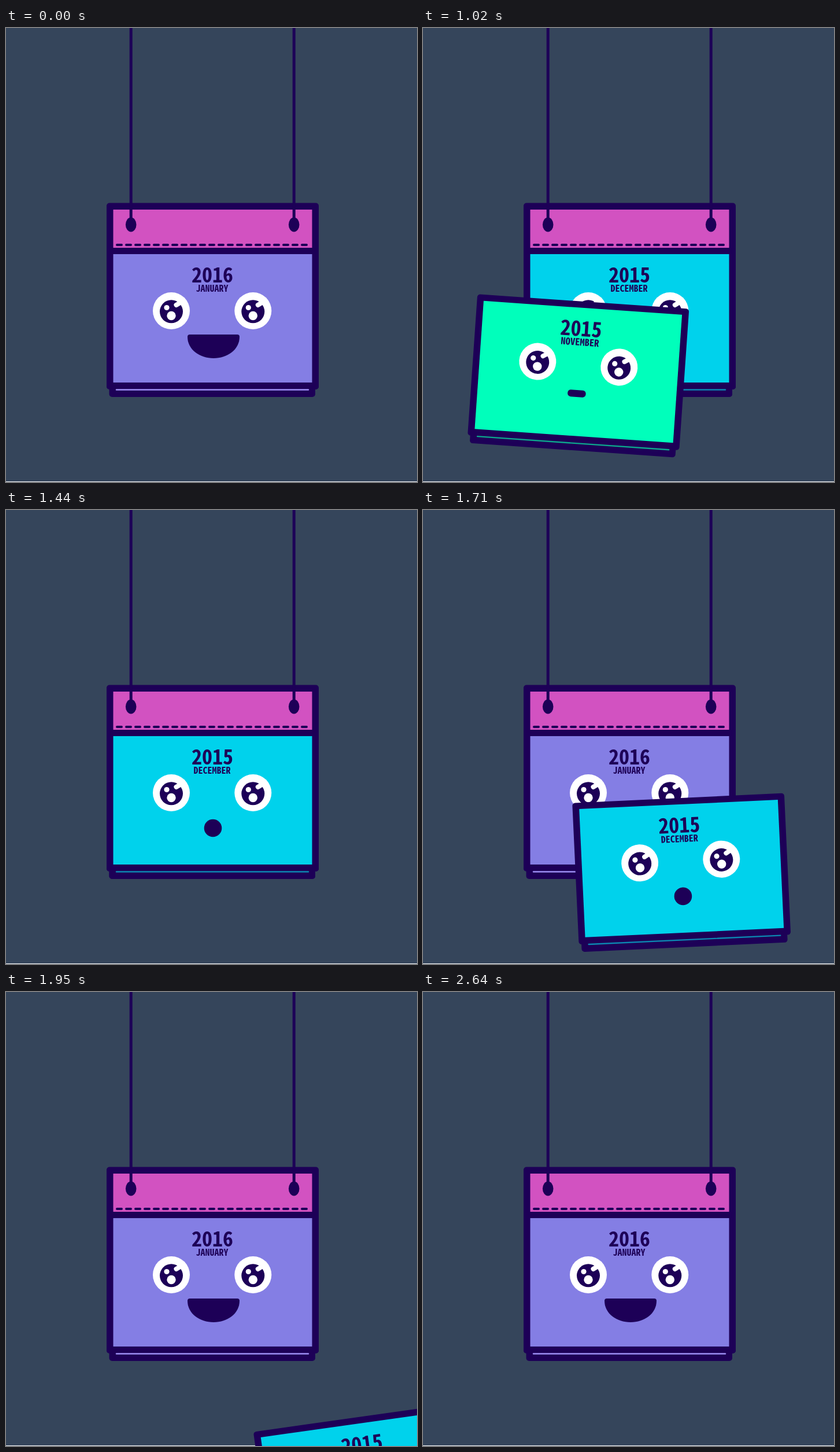
These frames come from a looping animation (711 by 785 pixels, 2.73 s). An HTML page:

```html
<!DOCTYPE html>
<html lang="en">
<head>
<meta charset="utf-8">
<title>Calendar</title>
<style>
  html, body { margin: 0; width: 100%; height: 100%; overflow: hidden; background: #fff; }
  svg { display: block; width: 100vw; height: 100vh; }
  text { font-weight: 600; font-stretch: 62.5%; text-anchor: middle; fill: #1d0057; }
  .year { font-size: 40.5px; }
  .month { font-size: 17.5px; }
  .ink { fill: #1d0057; }
  .white { fill: #fff; }
</style>
</head>
<body>
<svg id="stage" viewBox="0 0 711 785"></svg>
<script>
const stage = document.getElementById('stage');
const LOOP = 2730, STEP = 30;
const SHOW_OLD = 630; // the older pages reappear
const INK = '#1d0057';

const mouths = {
  smile: '<path class="ink" d="M318 530H400Q404 530 404 534C404 556 383 571 359 571S314 556 314 534Q314 530 318 530Z"/>',
  gasp: '<circle class="ink" cx="358" cy="550" r="15.3"/>',
  flat: '<rect class="ink" x="341.5" y="533.5" width="31.5" height="12" rx="5.5"/>'
};

// dx, dy in px per ms; spin in degrees per ms
const pages = [
  { year: 2016, month: 'JANUARY', width: 56, fill: '#847ee4', edge: '#9d8ff4', mouth: 'smile' },
  { year: 2015, month: 'DECEMBER', width: 64, fill: '#00d2ec', edge: '#0c86b0', mouth: 'gasp',
    start: 1590, dx: 0.75, dy: 0.983, spin: -1 / 45 },
  { year: 2015, month: 'NOVEMBER', width: 66, fill: '#00ffbb', edge: '#0da58c', mouth: 'flat',
    start: 900, dx: -0.7435, dy: 0.771, spin: 1 / 30 }
];

const eye = x => `<g transform="translate(${x} 489)">
  <circle class="white" r="32"/>
  <circle class="ink" cy="1.3" r="20"/>
  <circle class="white" cx="-8" cy="-5.5" r="4.6"/>
  <circle class="white" cy="8.5" r="7.7"/>
  <path d="M8.5-10L20-17" stroke="#fff" stroke-width="8" stroke-linecap="round"/>
</g>`;

const drawPage = p => `<g class="page">
  <rect class="ink" x="178.5" y="600" width="356.5" height="38" rx="5"/>
  <rect class="ink" x="174" y="380" width="367" height="245" rx="5"/>
  <rect x="185.5" y="391" width="344" height="222" fill="${p.fill}"/>
  <path d="M191 625.5H523" stroke="${p.edge}" stroke-width="2.4" stroke-linecap="round"/>
  <text class="year" x="357" y="440" data-width="72">${p.year}</text>
  <text class="month" x="356.5" y="456.3" data-width="${p.width}">${p.month}</text>
  ${eye(286)}${eye(427.3)}${mouths[p.mouth]}
</g>`;

const drawString = x => `<path d="M${x} 0V340" stroke="${INK}" stroke-width="5"/>
  <ellipse class="ink" cx="${x}" cy="340" rx="9.3" ry="12.5"/>`;

stage.innerHTML = `<rect width="711" height="784" fill="#35455b"/>
  <rect class="ink" x="174" y="302.5" width="367" height="322" rx="5"/>
  <rect x="185.5" y="314" width="344" height="66" fill="#d252c1"/>
  <path d="M192 375H528" stroke="${INK}" stroke-width="4" stroke-linecap="round" stroke-dasharray="8 8"/>
  ${drawString(216.2)}${drawString(498.2)}
  ${pages.map(drawPage).join('')}`;

// Use the narrowest face available, then reduce its size where it is still too wide.
const labels = [...stage.querySelectorAll('text')];
const faces = ['Noto Sans', 'Roboto', 'Open Sans', 'Roboto Condensed', 'Liberation Sans Narrow', 'Noto Sans Mono CJK JP'];
function lengthIn(face) {
  stage.style.fontFamily = `"${face}", sans-serif`;
  return labels.reduce((sum, label) => sum + label.getComputedTextLength(), 0);
}
const widths = faces.map(lengthIn);
lengthIn(faces[widths.indexOf(Math.min(...widths))]);
for (const label of labels) {
  const size = parseFloat(getComputedStyle(label).fontSize);
  const fit = Math.min(1, label.dataset.width / label.getComputedTextLength());
  label.style.fontSize = size * fit + 'px';
}

const groups = stage.querySelectorAll('.page');

function render(time) {
  const t = Math.floor((time % LOOP) / STEP) * STEP;
  pages.forEach((p, i) => {
    if (!p.start) return;
    const u = Math.max(0, t - p.start);
    groups[i].style.visibility = t < SHOW_OLD || u > 600 ? 'hidden' : 'visible';
    groups[i].setAttribute('transform', `translate(${p.dx * u} ${p.dy * u}) rotate(${p.spin * u} 357 509)`);
  });
}

const begin = performance.now();
function tick() {
  render(performance.now() - begin);
  requestAnimationFrame(tick);
}
tick();
</script>
</body>
</html>
```
